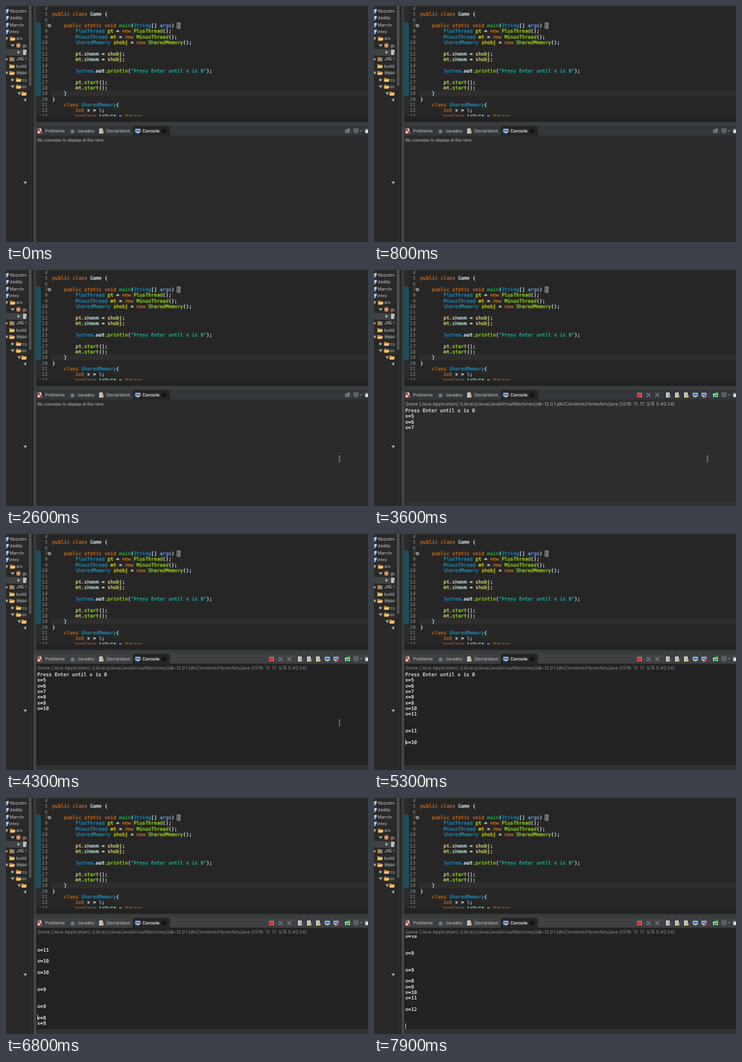
An HTML page that plays this animation: 600x390 px, repeating every 8000 ms.

```html
<!DOCTYPE html>
<html lang="en">
<head>
<meta charset="utf-8">
<style>
html, body { margin: 0; width: 100%; height: 100%; overflow: hidden; background: #292929; }
svg { display: block; }
text { white-space: pre; text-rendering: geometricPrecision; }
.ui { font: 7.3px Inter, "Noto Sans CJK KR", sans-serif; fill: #c9c9c9; }
.menu { font: 9.1px Inter, "DejaVu Sans", sans-serif; fill: #f2f2f2; }
.mono { font: 8px "DejaVu Sans Mono", monospace; color: #f4f4f4; }
.mono, .mono tspan { fill: currentColor; stroke: currentColor; stroke-width: .2px; }
.number { color: #8d8d8d; stroke: none; }
#status { font-size: 6.8px; }
#title { font-size: 7.6px; }
.k { color: #d9731f } .c { color: #1b96c9 } .p { color: #eef4f8 } .m { color: #1eb540 }
.a { color: #79abff } .d { color: #f2f200 } .u { color: #f3ec79 } .f { color: #cfeee0 }
.g { color: #a7ec21 } .s { color: #17c6a3 } .n { color: #6897bb }
.o { color: #d4ecf8; font-weight: bold; font-style: italic }
</style>
</head>
<body>
<svg width="600" height="390" viewBox="0 0 600 390">
  <defs>
    <clipPath id="treeClip"><rect width="34.5" height="390"/></clipPath>
    <clipPath id="editorClip"><rect x="50" width="550" height="182.5"/></clipPath>
    <clipPath id="consoleClip"><rect x="50" y="227" width="550" height="155.5"/></clipPath>
  </defs>
  <g id="tree" clip-path="url(#treeClip)"></g>
  <rect x="34.5" width="1" height="390" fill="#222"/>
  <rect x="38" y="-4" width="4" height="136" rx="2" fill="#505050"/>
  <rect x="44" width="6" height="390" fill="#393c3d"/>
  <rect x="44" width="1.5" height="390" fill="#242424"/>
  <rect x="46" y="198" width="4" height="192" fill="#444647"/>
  <rect x="50" width="550" height="194" fill="#262626"/>
  <g id="editor" clip-path="url(#editorClip)"></g>
  <rect x="50" y="182.5" width="550" height="9" fill="#222"/>
  <rect x="46" y="191.5" width="554" height="7" fill="#393c3d"/>
  <rect id="tabBar" x="50" y="198" width="550" height="16.5"/>
  <path d="M210 214.5V200q0-2 2-2h56q4 0 4 4v12.5z" fill="#262626"/>
  <rect id="panel" x="50" y="214.5" width="550" height="176"/>
  <g id="tabs"></g>
  <g id="idle"><text id="status" class="ui" x="52" y="223.7">No consoles to display at this time.</text></g>
  <g id="running">
    <rect x="50" y="382" width="550" height="8" fill="#323232"/>
    <text id="title" class="ui" x="52" y="223.7">Game [Java Application] /Library/Java/JavaVirtualMachines/jdk-12.0.1.jdk/Contents/Home/bin/java (2019. 11. 17. 오후 5:40:24)</text>
  </g>
  <g clip-path="url(#consoleClip)">
    <g id="output"></g>
    <rect id="caret" x="52" width="1" height="9" fill="#ddd"/>
  </g>
  <g id="menu">
    <rect x="459" y="287.5" width="150" height="54.5" rx="3.5" fill="#242424" stroke="#505050" stroke-width=".7"/>
    <rect id="highlight" x="459.4" width="141" height="14.5" fill="#0b5fd7"/>
    <path d="M460 321h140" stroke="#4a4a4a"/>
  </g>
  <circle id="ring" cx="553.5" cy="311.5" r="13.5" fill="#80808022" stroke="#222" stroke-width="1"/>
  <path id="arrow" d="M0 0v10.5l2.5-2.3 1.7 4 1.8-.8-1.7-3.8h3.4z" fill="#111" stroke="#fff" stroke-width=".8"/>
  <path id="beam" d="M550.8 307q1.9 0 1.9 1.4v7.2q0 1.4-1.9 1.4M554.6 307q-1.9 0-1.9 1.4v7.2q0 1.4 1.9 1.4M551.4 313h2.6" fill="none" stroke="#8c8c8c" stroke-width=".9"/>
</svg>
<script>
const $ = id => document.getElementById(id);
const add = (id, svg) => $(id).insertAdjacentHTML('beforeend', svg);
const label = (x, y, s, cls = 'ui', more = '') => `<text class="${cls}" x="${x}" y="${y}" ${more}>${s}</text>`;
const box = (x, y, w, h, fill) => `<rect x="${x}" y="${y}" width="${w}" height="${h}" fill="${fill}"/>`;
const shape = (x, y, d, fill) => `<path transform="translate(${x} ${y})" d="${d}" fill="${fill}"/>`;
const down = (x, y) => shape(x, y, 'M-3-2h6l-3 4.6z', '#aaa');
const right = (x, y) => shape(x, y, 'M-2-3v6l4.6-3z', '#aaa');
const folder = (x, y) => shape(x, y, 'M-4.5-3h3.5l1 1h4v5h-8.5z', '#c98a35') + shape(x, y, 'M-3-.5h8l-2 3.8h-7.5z', '#f1c877');
const page = (x, y, accent, paper = '#e4e4dc') =>
  box(x - 3.5, y - 4, 6, 8, paper) + box(x - 2.3, y - 2, 3.5, .8, '#667') + box(x - 2.3, y, 3.5, .8, '#667') + box(x, y + .5, 4, 3.5, accent);
const screen = (x, y, frame, glass) => box(x - 4, y - 3.5, 8, 6, frame) + box(x - 3, y - 2.5, 6, 4, glass) + box(x - 2, y + 3, 4, 1, frame);
const cross = (x, y, fill) => shape(x, y, 'M-4-2.5l1.5-1.5 2.5 2.5 2.5-2.5 1.5 1.5-2.5 2.5 2.5 2.5-1.5 1.5-2.5-2.5-2.5 2.5-1.5-1.5 2.5-2.5z', fill);

// Project tree
const rowY = i => 8.5 + i * 11.34;
const rows = ['6Aboutme', '6daddy', '6Marvin', '6intro', '17src', '27ga', '', '17JRE System', '17build', '17WebContent', '27css', '27img'];
add('tree', box(0, rowY(6) - 5.5, 35, 11, '#404243') + rows.map((row, i) => {
  const x = parseInt(row) || 0;
  return label(x, rowY(i) + 2.6, row.replace(/^\d+/, '')) + (x == 6 ? shape(0, rowY(i), 'M0-2l3-2 2 2-3 6h-2z', '#b9d2ea') + box(0, rowY(i), 2, 3, '#4a86c8') : '');
}).join('') +
  [[11, 4], [10, 8], [10, 9], [21, 10], [21, 11], [30, 12]].map(([x, i]) => folder(x, rowY(i))).join('') +
  [[1, 4], [11, 5], [1, 9], [11, 11], [22, 12]].map(([x, i]) => down(x, rowY(i))).join('') +
  [[21, 6], [1, 7], [11, 10]].map(([x, i]) => right(x, rowY(i))).join('') +
  down(32, 155.5) + down(32, 292) +
  box(17, rowY(5) - 3.5, 7, 7, '#a8683a') + box(20, rowY(5) - 3.5, 1, 7, '#e8cfa0') + box(17, rowY(5) - .5, 7, 1, '#e8cfa0') +
  page(32, rowY(6), '#4a86c8') +
  ['#d8843c', '#d8a04a', '#5b93c9'].map((c, i) => box(6 + i * 2.8, rowY(7) - 3.5 + i * .5, 2.3, 7 - i * .5, c)).join(''));

// Source code: "~x" switches to colour class x
const code = [
  '', '~kpublic class ~pGame {', '',
  '    ~kpublic static void ~mmain~p(~cString~p[] ~aargs~p) {',
  '        ~cPlusThread ~dpt ~p= ~knew ~gPlusThread~p();',
  '        ~cMinusThread ~dmt ~p= ~knew ~gMinusThread~p();',
  '        ~cSharedMemory ~dshobj ~p= ~knew ~gSharedMemory~p();', '',
  '        ~upt~p.~fshmem ~p= ~ushobj~p;',
  '        ~umt~p.~fshmem ~p= ~ushobj~p;', '',
  '        ~cSystem~p.~oout~p.~gprintln~p(~s"Press Enter until x is 0"~p);', '',
  '        ~upt~p.~gstart~p();', '        ~umt~p.~gstart~p();',
  '    ~p}', '~p}', '    ~kclass ~cSharedMemory~p{',
  '        ~kint ~fx ~p= ~n5~p;', '        ~kboolean ~fisQuit ~p= ~kfalse~p;'
];
const paint = s => s.split('~').map((part, i) => i ? `<tspan class="${part[0]}">${part.slice(1)}</tspan>` : part).join('');
const codeY = n => 13.5 + (n - 5) * 9.345;
add('editor', box(50, 0, 8, 183, '#2c2c2c') + box(50, codeY(7) - 4.7, 8, 13 * 9.345, '#1f4c5b') +
  box(76, codeY(19) - 4.7, 524, 9.4, '#2e2e2e') +
  code.map((s, i) => label(69, codeY(i + 4) + 2.9, i + 4, 'mono number', 'text-anchor="end"') +
    label(76.8, codeY(i + 4) + 2.9, paint(s), 'mono')).join('') +
  '<circle cx="72" cy="32.3" r="2.8" fill="#92969a"/><path d="M70.5 32.3h3" stroke="#333" stroke-width=".8"/>' +
  '<rect x="283.6" y="28" width="5" height="9" fill="none" stroke="#ccc" stroke-width=".8"/>');

// View tabs and toolbar
add('tabs', page(56, 206.5, '#d23c3c') + box(52, 203, 4, 3.5, '#d23c3c') + label(65, 209, 'Problems') +
  label(107, 208.7, '@', 'ui', 'style="fill:#8fb4dc;font-size:6.5px;font-weight:700"') + label(118, 209, 'Javadoc') +
  page(158, 206.5, '#e0a83c') + label(166.5, 209, 'Declaration') +
  screen(218.5, 206.5, '#dbe6f2', '#3f7fc4') + label(226, 209, 'Console', 'ui', 'style="fill:#fff;font-weight:500"') +
  cross(262.5, 206.5, '#0c0c0c') + screen(580, 206, '#71808c', '#4a5963') +
  shape(588.5, 206.5, 'M-1.8-1h3.6l-1.8 2.2z', '#888') + box(595.5, 203, 5, 7, '#d8dde2') + box(595.5, 203, 5, 2, '#5b8fca'));
add('idle', box(562, 204, 8, 6, '#696e70') + box(566, 202.5, 4, 3, '#7d8284'));
add('running', box(436.5, 203, 7.5, 7, '#e8b0b0') + box(437.2, 203.7, 6, 5.6, '#d3222f') +
  cross(455, 206.5, '#696d6f') + cross(469.5, 206.5, '#696d6f') +
  box(478, 202, .8, 9, '#555') + box(555.5, 202, .8, 9, '#555') +
  page(487.5, 206.5, '#8a9aa8') + page(502.5, 206.5, '#d8a43c') + page(517.5, 206.5, '#e0b04a') +
  screen(532.5, 206.5, '#dbe6f2', '#3f7fc4') + screen(547, 206.5, '#dbe6f2', '#3f7fc4') + box(548, 207, 3.5, 3.5, '#c44') +
  box(562, 204, 8, 6, '#d9e8dc') + box(563, 205.5, 6, 4, '#38a35c') + box(566.5, 202.5, 4, 3, '#4cc274'));

// Run menu
add('menu', box(476, 292, 5.5, 8.5, '#b7bcc0') + box(477, 293.5, 3.5, 1, '#555') + box(474.5, 297, 4, 3.5, '#5aa05a') +
  box(474, 306.5, 8.5, 7.5, '#e6edf5') + box(474, 306.5, 8.5, 2, '#7aa6d8') + box(477.6, 309.5, 1.3, 3.5, '#456') +
  label(486.5, 299.6, '1 Run on Server', 'menu') + label(486, 313.8, '2 Java Application', 'menu') +
  label(598.5, 299.6, '⌥⇧X R', 'menu', 'text-anchor="end"') + label(598.5, 313.8, '⌥⌘X J', 'menu', 'text-anchor="end"') +
  label(472.5, 334.6, 'Run Configurations...', 'menu'));

// Program output: a value every 300 ms, with Enter presses in between
const START = 2800, FOCUS = 3700, LINE = 9.33, TOP = 232;
const values = [5, 6, 7, 8, 9, 10, 11, 11, 10, 10, 9, 9, 8, 9, 10, 11, 12];
const enters = [4700, 4800, 5100, 5400, 5600, 5700, 5900, 6000, 6200, 7500, 7700, 7800];
const events = [
  { at: START, text: 'Press Enter until x is 0' },
  ...values.map((v, i) => ({ at: START + i * 300, text: 'x=' + v })),
  ...enters.map(at => ({ at, text: '' }))
].sort((a, b) => a.at - b.at);

function consoleAt(t) {
  const lines = [];
  let caret = -1, top = 0;
  for (const { at, text } of events) {
    if (at > t) break;
    lines.push(text);
    if (!text) caret = lines.length;
    top = Math.max(top, lines.length - (text ? 16 : 15.54));
  }
  return { lines, caret, top };
}

const show = (id, on) => $(id).style.display = on ? '' : 'none';
const fill = (id, colour) => $(id).style.fill = colour;
let last = -1;

function draw(now) {
  requestAnimationFrame(draw);
  const t = Math.floor(now % 8000 / 100) * 100;
  if (t === last) return;
  last = t;

  const running = t >= START, focused = t >= FOCUS;
  show('idle', !running);
  show('running', running);
  fill('panel', focused ? '#222' : running ? '#2d2d2d' : '#2a2a2a');
  fill('tabBar', focused ? '#3e4042' : '#343739');
  fill('title', focused ? '#8e8e8e' : '#b4b4b4');

  const { lines, caret, top } = consoleAt(t);
  const lineY = i => TOP + (i - top) * LINE;
  $('output').innerHTML = lines.map((s, i) => label(51.8, lineY(i) + 2.9, s, 'mono')).join('');
  show('caret', caret >= 0);
  $('caret').setAttribute('y', lineY(caret) - 4.5);

  const move = Math.min(1, Math.max(0, (t - 1300) / 500)), ease = 1 - (1 - move) ** 2;
  show('menu', t >= 1300 && t < 2300);
  show('highlight', t >= 1500);
  $('highlight').setAttribute('y', t < 1700 ? 289 : 303);
  show('ring', t >= 1900 && t < 2200);
  show('arrow', t >= 1300 && t < 2500);
  $('arrow').setAttribute('transform', `translate(${600 - 45 * ease} ${294 + 17 * ease})`);
  show('beam', t >= 2500 && t < enters[0]);
}
requestAnimationFrame(() => draw(performance.now()));
</script>
</body>
</html>
```
